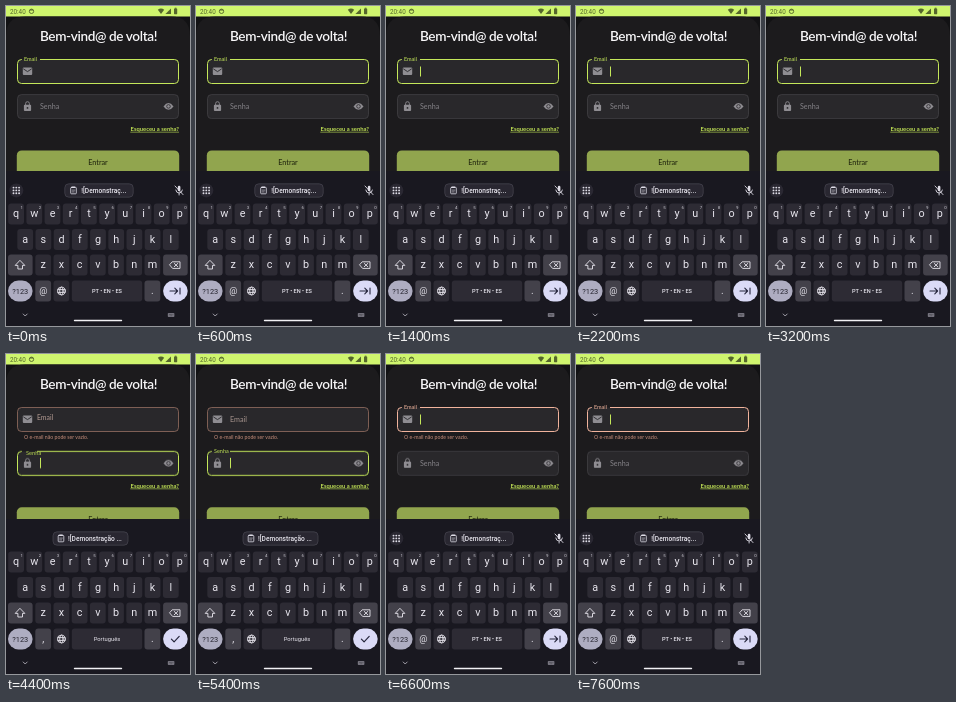
Animation, 184 px wide and 320 px high, one loop 8 s. Source, as an HTML page:

```html
<!DOCTYPE html>
<html lang="pt">
<head>
<meta charset="utf-8">
<title>Login</title>
<style>
  html, body { margin: 0; width: 100%; height: 100%; overflow: hidden; background: #1c1b1e; }
  svg { display: block; width: 100vw; height: 100vh; }
  :root { --lime: #c4e75a; --peach: #f0b39c; --dim: #a67a6b; --grey: #8f8d92; --ink: #e8e6ee; --field: #29282b; }
  text { font-family: Lato, sans-serif; }
  .kb text { font-family: Roboto, sans-serif; fill: var(--ink); }
  .mid { text-anchor: middle; }
  .line { fill: none; stroke-linecap: round; stroke-linejoin: round; }
  .anim, .anim * { animation-duration: 8s; animation-timing-function: step-end; animation-iteration-count: infinite; }

  .lower { animation-name: lower; }
  .email-box { animation-name: email-box; }
  .email-label { animation-name: email-label; }
  .email-caret { animation-name: email-caret; }
  .pass-box { animation-name: pass-box; }
  .pass-label { animation-name: pass-label; }
  .pass-caret { animation-name: pass-caret; }
  .error { animation-name: error; }
  .bar-email { animation-name: bar-email; }
  .bar-pass { animation-name: bar-pass; }

  @keyframes lower { 0% { transform: none } 55%, 100% { transform: translateY(8.8px) } }
  @keyframes email-box {
    0% { stroke: var(--lime); stroke-width: 1; stroke-dasharray: .5 18 999 }
    55% { stroke: var(--dim); stroke-width: .7; stroke-dasharray: 999 0 0 }
    82.5%, 100% { stroke: var(--peach); stroke-width: 1; stroke-dasharray: .5 18 999 }
  }
  @keyframes email-label {
    0% { transform: translate(18px, 54.9px) scale(.77); fill: var(--lime) }
    55% { transform: translate(31px, 65.8px) scale(.96); fill: #b39a92 }
    57.5% { transform: translate(34px, 67.6px); fill: #a8958f }
    82.5%, 100% { transform: translate(18px, 54.9px) scale(.77); fill: var(--peach) }
  }
  @keyframes email-caret {
    0%, 7.5%, 20%, 32.5%, 45%, 55%, 87.5% { opacity: 0 }
    2.5%, 15%, 27.5%, 40%, 52.5%, 82.5%, 95%, 100% { opacity: 1 }
  }
  @keyframes pass-box {
    0%, 82.5%, 100% { stroke: #47464a; stroke-width: .7; stroke-dasharray: 999 0 0 }
    55% { stroke: var(--lime); stroke-width: 1; stroke-dasharray: .5 15 999 }
    57.5% { stroke: var(--lime); stroke-width: 1; stroke-dasharray: .5 18 999 }
  }
  @keyframes pass-label {
    0%, 82.5%, 100% { transform: translate(34px, 102.8px); fill: #858388 }
    55% { transform: translate(20px, 92.3px) scale(.8); fill: #b5d44e }
    57.5% { transform: translate(18px, 90.4px) scale(.77); fill: var(--lime) }
  }
  @keyframes pass-caret {
    0%, 62.5%, 75%, 82.5%, 100% { opacity: 0 }
    55%, 67.5%, 80% { opacity: 1 }
  }
  @keyframes error { 0% { opacity: 0 } 55%, 100% { opacity: 1 } }
  @keyframes bar-email { 0%, 82.5%, 100% { opacity: 1 } 55% { opacity: 0 } }
  @keyframes bar-pass { 0%, 82.5%, 100% { opacity: 0 } 55% { opacity: 1 } }
</style>
</head>
<body>
<svg viewBox="0 0 184 320" class="anim">
  <!-- status bar and page -->
  <rect width="184" height="320" fill="#121214"/>
  <rect width="184" height="10.5" fill="#cff56e"/>
  <path d="M0 166V30Q0 10.5 19 10.5H165Q184 10.5 184 30V166Z" fill="#1c1b1d"/>
  <g fill="#55662c">
    <text x="4" y="7.6" font-size="6.3" style="font-family:Roboto,sans-serif">20:40</text>
    <circle cx="25.5" cy="5.3" r="2.2" fill="none" stroke="#55662c" stroke-width=".9"/>
    <path d="M23.5 4.6A2.2 2.2 0 0 1 27.5 4.6Z"/>
    <path d="M151.8 3.8Q155 1.2 158.2 3.8L155 8Z"/>
    <path d="M159.4 8H165V2.4Z"/>
    <rect x="168" y="2.4" width="3.2" height="5.8" rx=".6"/>
    <rect x="168.8" y="1.7" width="1.6" height="1"/>
  </g>
  <text class="mid" x="92.5" y="35" font-size="13.6" font-weight="600" letter-spacing="-.38" fill="#f8f7f9">Bem-vind@ de volta!</text>

  <!-- e-mail -->
  <rect class="email-box" x="11.5" y="53.5" width="161" height="24" rx="4" fill="var(--field)"/>
  <g fill="var(--grey)">
    <rect x="16.8" y="61.4" width="9.4" height="7.6" rx="1"/>
    <path class="line" d="M17.6 63L21.5 65.6L25.4 63" stroke="var(--field)" stroke-width=".9"/>
  </g>
  <text class="email-label" font-size="7.16">Email</text>
  <rect class="email-caret" x="34" y="60.5" width="1" height="10" fill="var(--lime)"/>
  <text class="error" x="18" y="84.6" font-size="5.2" fill="#c78f7c">O e-mail não pode ser vazio.</text>

  <!-- password, link and button -->
  <g class="lower">
    <rect class="pass-box" x="11.5" y="88.6" width="161" height="24" rx="4" fill="var(--field)"/>
    <g fill="var(--grey)">
      <rect x="17.9" y="98.8" width="7.2" height="6.2" rx=".9"/>
      <path class="line" d="M19.6 99V97.6A1.9 1.9 0 0 1 23.4 97.6V99" stroke="var(--grey)" stroke-width=".9"/>
      <circle cx="21.5" cy="101.9" r=".9" fill="var(--field)"/>
      <path d="M157.5 100.4Q162.5 93.6 167.5 100.4Q162.5 107.2 157.5 100.4Z"/>
      <circle cx="162.5" cy="100.4" r="1.8" fill="none" stroke="var(--field)" stroke-width=".8"/>
    </g>
    <text class="pass-label" font-size="7.16">Senha</text>
    <rect class="pass-caret" x="34" y="95" width="1" height="10.4" fill="var(--lime)"/>
    <text x="173" y="124.9" text-anchor="end" font-size="5.85" font-weight="700" fill="#bfe055">Esqueceu a senha?</text>
    <rect x="124.3" y="125.8" width="48.7" height=".6" fill="#bfe055"/>
    <rect x="10.8" y="144.4" width="162.4" height="25" rx="5" fill="#91a54e"/>
    <text class="mid" x="92" y="158.8" font-size="7.2" font-weight="500" fill="#23280f">Entrar</text>
  </g>

  <!-- keyboard -->
  <g class="kb">
    <rect y="165" width="184" height="155" fill="#191820"/>
    <g class="bar-email">
      <circle cx="10.3" cy="184.4" r="7" fill="#2a2832"/>
      <g id="dots" fill="#dedce6"></g>
      <rect x="58.8" y="177.8" width="68.4" height="13.4" rx="4" fill="#292731" stroke="#4a4852" stroke-width=".7"/>
      <use href="#clip" x="67.5"/>
      <text x="75.3" y="186.8" font-size="6.6" font-weight="500">![Demonstraç...</text>
      <g class="line" stroke="#dedce6" stroke-width=".9">
        <rect x="171.8" y="179.8" width="2.6" height="5.4" rx="1.3" fill="#dedce6" stroke="none"/>
        <path d="M169.8 184Q170.2 187 173.1 187Q176 187 176.4 184M173.1 187V189"/>
        <path d="M169 180L177 188.6"/>
      </g>
    </g>
    <g class="bar-pass">
      <rect x="47" y="177.8" width="75" height="13.4" rx="4" fill="#292731" stroke="#4a4852" stroke-width=".7"/>
      <use href="#clip" x="55"/>
      <text x="62" y="186.8" font-size="6.6" font-weight="500">![Demonstração ...</text>
    </g>
    <g id="keys"></g>

    <g class="line" stroke="var(--ink)" stroke-width=".9">
      <path d="M14.2 254.6L18.8 259.4H16.5V263H11.9V259.4H9.6Z"/>
      <path d="M166.6 255.8H174V262.4H166.6L163.8 259.1Z M168.3 257.5L171.7 260.7M171.7 257.5L168.3 260.7"/>
      <circle cx="55.4" cy="285" r="3.9"/>
      <ellipse cx="55.4" cy="285" rx="1.7" ry="3.9"/>
      <path d="M51.8 283.6H59M51.8 286.4H59"/>
      <path d="M17.2 308L19.2 310L21.2 308" stroke="#b0aeb8"/>
    </g>
    <g class="mid">
      <text x="14.3" y="287.6" font-size="7.4" style="fill:#25242e">?123</text>
      <text x="146.4" y="288" font-size="10">.</text>
    </g>
    <g class="bar-email mid">
      <text x="37.2" y="287.8" font-size="9">@</text>
      <text x="101" y="287" font-size="5.6" font-weight="500">PT • EN • ES</text>
      <path class="line" d="M164 285H171.6M168.8 282.2L171.6 285L168.8 287.8M174 282V288" stroke="#25263c" stroke-width="1.1"/>
    </g>
    <g class="bar-pass mid">
      <text x="37.2" y="288" font-size="10">,</text>
      <text x="101" y="287" font-size="5.8">Português</text>
      <path class="line" d="M165.4 285.2L168.1 287.9L173.2 282.4" stroke="#25263c" stroke-width="1.2"/>
    </g>

    <!-- navigation -->
    <rect x="161.8" y="307" width="6.6" height="4" rx=".8" fill="#77757f"/>
    <path d="M163 308.4H167.4M163.8 309.8H166.4" stroke="#191820" stroke-width=".5" stroke-dasharray=".7 .5"/>
    <rect x="67.8" y="313.7" width="48.4" height="1.5" rx=".7" fill="#f2f1f5"/>
  </g>

  <defs>
    <g id="clip" class="line" stroke="#dedce6" stroke-width=".8">
      <rect x="-2.8" y="181.4" width="5.6" height="6.4" rx=".7"/>
      <path d="M-1.2 181.3H1.2" stroke-width="1.5"/>
      <path d="M-1.3 184.1H1.3M-1.3 185.9H.7" stroke-width=".6"/>
    </g>
  </defs>
</svg>
<script>
  const keys = document.getElementById('keys');
  const dots = document.getElementById('dots');
  const PLAIN = '#2d2b34', SPECIAL = '#43414a', STEP = 18.2;

  function add(parent, tag, attrs, text) {
    const el = document.createElementNS('http://www.w3.org/2000/svg', tag);
    for (const name in attrs) el.setAttribute(name, attrs[name]);
    if (text) el.textContent = text;
    parent.append(el);
  }

  function key(cx, cy, width, fill = PLAIN, rx = 3) {
    add(keys, 'rect', { x: cx - width / 2, y: cy - 10.4, width, height: 20.8, rx, fill });
  }

  function row(letters, x, cy, digits = '') {
    [...letters].forEach((letter, i) => {
      const cx = x + i * STEP;
      key(cx, cy, 15.8);
      add(keys, 'text', { x: cx, y: cy + 3.4, 'font-size': 10.8, class: 'mid' }, letter);
      if (digits) add(keys, 'text', { x: cx + 5.6, y: cy - 4.8, 'font-size': 4.4, class: 'mid', opacity: .85 }, digits[i]);
    });
  }

  row('qwertyuiop', 10.1, 208, '1234567890');
  row('asdfghjkl', 19.2, 233.5);
  row('zxcvbnm', 37.2, 259);
  key(14.3, 259, 24.6, SPECIAL);
  key(169.4, 259, 24.6, SPECIAL);
  key(14.3, 285, 24.6, '#aeadc1', 10.4);
  key(37.2, 285, 15.8, SPECIAL);
  key(55.4, 285, 15.8);
  key(101, 285, 70.4);
  key(146.4, 285, 15.8, SPECIAL);
  key(169.4, 285, 24.6, '#dadaf6', 10.4);

  for (let i = 0; i < 9; i++)
    add(dots, 'circle', { cx: 7.5 + i % 3 * 2.8, cy: 181.6 + Math.floor(i / 3) * 2.8, r: .95 });
</script>
</body>
</html>
```
